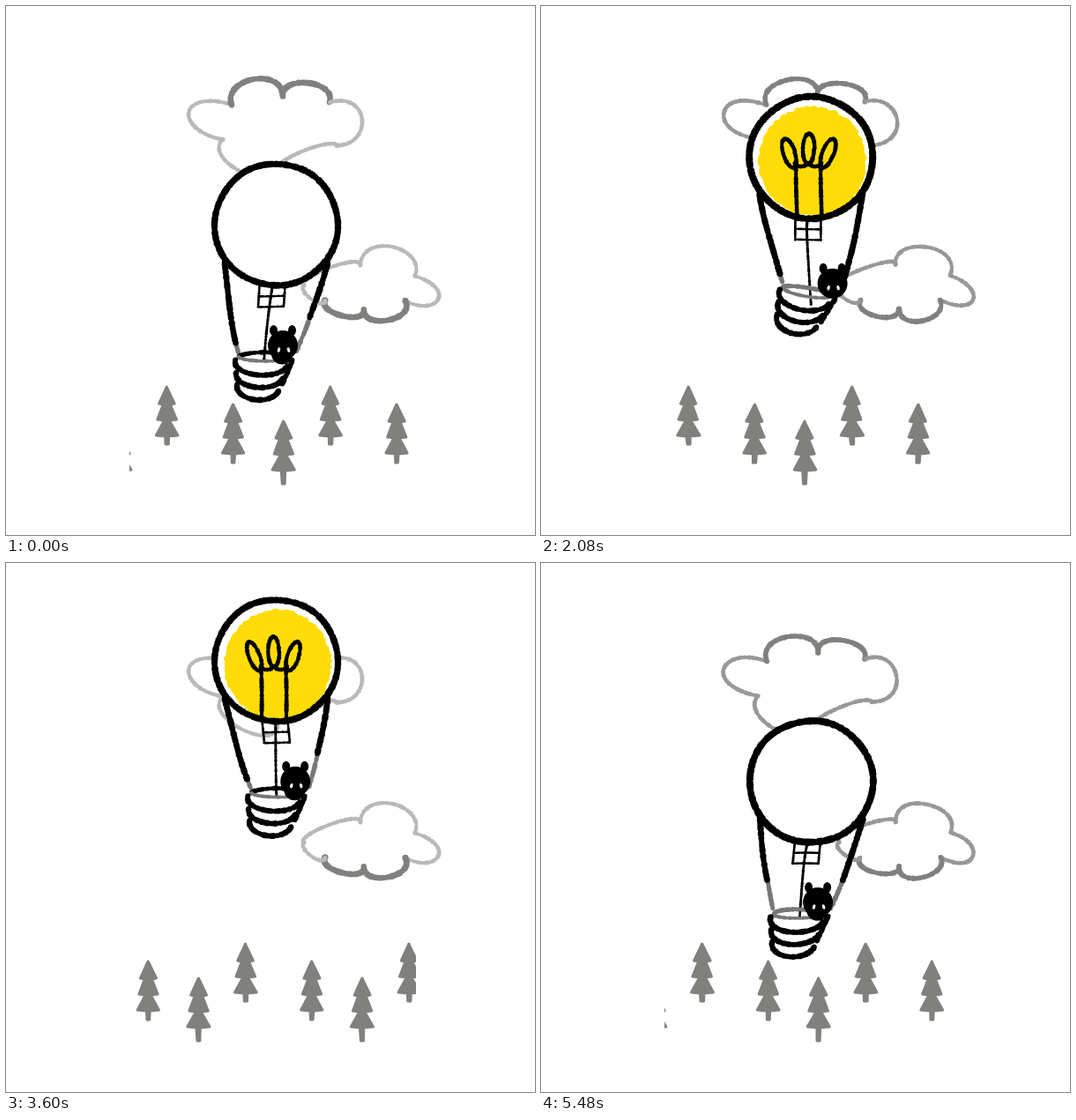
Write an HTML page with a canvas that moves like this. It is 600 px wide and 600 px high and loops after 5.52 s.

```html
<!DOCTYPE html>
<html lang="en">
<head>
<meta charset="utf-8">
<title>Balloon</title>
<style>
html, body { margin: 0; width: 100%; height: 100%; overflow: hidden; background: #fff }
canvas { display: block }
</style>
</head>
<body>
<canvas width="600" height="600"></canvas>
<script>
const LOOP = 5520, STEP = 40, TAU = Math.PI * 2, CX = 306.5, RADIUS = 69;
const GREY = '#80807e', DRY = '#777', INK = '#000';
const ctx = document.querySelector('canvas').getContext('2d');
let look = 0; // which of three redrawn line sets is showing

const mix = (a, b, u) => a + (b - a) * u;
const mixPt = (a, b, u) => [mix(a[0], b[0], u), mix(a[1], b[1], u)];
const clamp = u => Math.max(0, Math.min(1, u));
const ease = (t, from, to) => { const u = clamp((t - from) / (to - from)); return u * u * (3 - 2 * u); };
const bump = (t, at, width) => Math.exp(-(((t - at) / width) ** 2));
const noise = n => { const s = Math.sin(n * 12.9898 + look * 78.233) * 43758.5453; return s - Math.floor(s) - .5; };

// Distance gained when speed grows from 0 to 1 over `span` ms around `mid`.
const glide = (t, mid, span) => {
  const x = (t - mid) / span + .5;
  return x > 1 ? t - mid : span * Math.max(0, x) ** 2 / 2;
};

const motion = {
  scroll: t => .0065 * t + .054 * (glide(t, 2250, 800) - glide(t, 5020, 1000)),
  lift: t => ease(t, 1740, 2380) - ease(t, 4540, 5440),
  height: t => 248 + motion.lift(t) * (3 * Math.cos((t - 2680) / 800 * TAU) - 139),
  swing: t => bump(t, 2680, 190) - .25 * bump(t, 2150, 180),
  sway: t => 298 - 8 * Math.cos(4 * t / LOOP * TAU) + 45 * motion.swing(t)
};

// Curves are functions of a position 0..1.
const line = (a, b) => u => mixPt(a, b, u);
const bezier = (a, b, c, d) => u => {
  const m = mixPt(b, c, u);
  return mixPt(mixPt(mixPt(a, b, u), m, u), mixPt(m, mixPt(c, d, u), u), u);
};
const through = (a, mid, b) => {
  const c = [0, 1].map(i => 2 * mid[i] - (a[i] + b[i]) / 2);
  return bezier(a, mixPt(a, c, 2 / 3), mixPt(b, c, 2 / 3), b);
};
const arc = (x, y, rx, ry, from = 0, to = TAU, tilt = 0) => u => {
  const a = mix(from, to, u), p = rx * Math.cos(a), q = ry * Math.sin(a);
  return [x + p * Math.cos(tilt) - q * Math.sin(tilt), y + p * Math.sin(tilt) + q * Math.cos(tilt)];
};

function brush(curve, width, color = INK, from = 0, to = 1) {
  let len = 0;
  for (let i = 0, p = curve(from); i < 12; i++) {
    const q = curve(mix(from, to, (i + 1) / 12));
    len += Math.hypot(q[0] - p[0], q[1] - p[1]);
    p = q;
  }
  const n = Math.ceil(len / 1.2);
  ctx.fillStyle = color;
  ctx.beginPath();
  for (let i = 0; i <= n; i++) {
    const [x, y] = curve(mix(from, to, i / n));
    const r = width / 2 + noise(i + n / 7) * Math.min(1, width * .16);
    const dx = Math.sin(i * .07 + look * 2) * .4, dy = Math.cos(i * .09 + look * 2) * .4;
    ctx.moveTo(x + dx + r, y + dy);
    ctx.arc(x + dx, y + dy, r, 0, TAU);
  }
  ctx.fill();
}

function oval(x, y, rx, ry, color, tilt = 0) {
  ctx.fillStyle = color;
  ctx.beginPath();
  ctx.ellipse(x, y, rx, ry, tilt, 0, TAU);
  ctx.fill();
}

// Lobes run clockwise between the corners [x, y, bulge]; a run of them is shaded dark.
function cloud(corners, dark, count) {
  corners.forEach(([x, y, bulge], i) => {
    const [x2, y2] = corners[(i + 1) % corners.length];
    const dx = x2 - x, dy = y2 - y, h = bulge / .75 / Math.hypot(dx, dy), spread = bulge > 0 ? .12 : 0;
    const shaded = i >= dark && i < dark + count;
    brush(bezier([x, y], [x + dy * h - dx * spread, y - dx * h - dy * spread],
      [x2 + dy * h + dx * spread, y2 - dx * h + dy * spread], [x2, y2]),
      shaded ? (look ? 5.5 : 6.5) : 4.5, shaded ? GREY : look ? '#989898' : '#b9b9b9');
  });
}

function tree(x, y, trunk) {
  const side = [[0, 1]];
  for (let i = 0; i < 3; i++) side.push([9 + 1.7 * i, 20 + 18 * i], [4 - i, 21 + 18 * i]);
  side.push([1.5, trunk]);
  ctx.beginPath();
  side.forEach(([a, b], i) => ctx.lineTo(x + a + noise(i + y), y + b));
  side.reverse().forEach(([a, b], i) => ctx.lineTo(x - a + noise(i + y + 20), y + b));
  ctx.closePath();
  ctx.fill();
  ctx.stroke();
}

function trees(t) {
  ctx.save();
  ctx.beginPath();
  ctx.rect(140, 400, 325, 160);
  ctx.clip();
  ctx.fillStyle = ctx.strokeStyle = GREY;
  ctx.lineWidth = 3;
  ctx.lineJoin = 'round';
  for (let x = 182.5 - 185.5 - motion.scroll(t); x < 500; x += 185.5) {
    tree(x, 431, 66);
    tree(x + 75, 451, 67);
    tree(x + 132, 470, 72);
  }
  ctx.restore();
}

function light(cy) {
  ctx.fillStyle = '#ffdc05';
  ctx.beginPath();
  for (let i = 0; i < 120; i++) {
    const [x, y] = arc(308, cy + 4, 61 + noise(i) * 3, 62 + noise(i) * 3)(i / 120);
    ctx.lineTo(x, y);
  }
  ctx.fill();
  for (const i of [-1, 0, 1]) {
    brush(arc(303.5 + 22 * i, cy - 10 + 5 * i * i, 6.5, 17, 0, TAU, .35 * i), 4.6);
    if (i) {
      brush(line([303.5 + 14 * i, cy + 10], [304 + 14 * i, cy + 67]), 4.6);
      brush(arc(303.5 + 8 * i, cy + 6, 7, 4, 0, Math.PI), 4.6);
    }
  }
}

function basket(at) {
  const ring = (...a) => { const c = arc(...a); return u => at(c(u)); };
  brush(ring(2, -23, 28, 5, Math.PI, TAU), 5, look ? DRY : INK);
  brush(ring(2, -23, 28, 5, 0, Math.PI), 4, DRY);
  for (let i = 0; i < 3; i++) {
    brush(ring(-i * 2, -17 + 14 * i, 30 - 3 * i, 15, .25, Math.PI + .2), 6);
  }
  brush(line(at([35, -20]), at([23, 8])), 5.5);
}

function passenger(head, hip, k) {
  const [x, y] = head, r = mix(17, 14, k);
  brush(line(head, hip), mix(24, 16, k));
  oval(x, y, r, r, INK);
  for (const s of [-1, 1]) {
    oval(x + s * mix(10.5, 6, k) - 4 * k, y - r, 4.5, 6, INK);
    oval(x + 1 + s * mix(5.5, 4, k), y + mix(5, -2, k), 1.6, 2.8, '#fff', -.3 * s);
  }
}

function balloon(t) {
  const cy = motion.height(t), bx = motion.sway(t), k = motion.swing(t), hang = Math.max(0, k);
  const by = cy + 173 - 7 * k, c = Math.cos(.75 * k), s = -Math.sin(.75 * k);
  const at = ([x, y]) => [bx + x * c - y * s, by + x * s + y * c];
  const near = (rest, swung) => { const p = mixPt(rest, swung, k); return [bx + p[0], by + p[1]]; };

  // Ropes slacken and bow out as the basket swings up
  for (const side of [-1, 1]) {
    const top = [CX + side * mix(58.5, 64 + 4 * side, hang), cy + 42 - 12 * hang];
    const end = at([6 + 33 * side, -29]), m = mixPt(top, end, .5);
    const rope = through(top, [m[0] + side * (2 + 12 * hang), m[1] + 11 * hang], end);
    const dry = look === 1 ? .68 : side > 0 && !look ? .62 : .9;
    brush(rope, 5, DRY, dry);
    brush(rope, 6.5, INK, 0, dry);
  }

  // Socket and pull cord
  const lean = (bx - 297) * .4 * (1 - hang * .95);
  const socket = (x, y) => [304 + x + lean * (y - 50) / 35, cy + y];
  for (const x of [-15, 14]) brush(line(socket(x, 69), socket(x, 93)), 2.8);
  for (const y of [81, 93]) brush(line(socket(-15, y), socket(14, y)), 2.5);
  brush(through(socket(0, 68), socket(-2, 94), near([3, -19], [-30, -68])), 3.2);

  basket(at);
  passenger(near([24, -36], [-24, -56]), near([23, -27], [-10, -16]), hang);

  oval(CX, cy, RADIUS, RADIUS, '#fff');
  if (t >= 1720 && t < 4440) light(cy);
  brush(arc(CX, cy, RADIUS + 1, RADIUS), look ? 7.5 : 7);
}

function draw() {
  const frame = Math.floor(performance.now() % LOOP / STEP), t = frame * STEP;
  look = [0, 2, 1][Math.floor((frame % 10 + 1.4) * .3) % 3];
  ctx.fillStyle = '#fff';
  ctx.fillRect(0, 0, 600, 600);
  cloud([[246, 151, 45], [256, 112, 24], [314, 102, 18], [367, 109, 33], [375, 158, -8], [308, 185, 23]], 1, 2);
  cloud([[338, 317, 9], [402, 294, 27], [464, 306, 34], [453, 334, 18], [406, 344, 13], [362, 334, 8]], 3, 2);
  trees(t);
  balloon(t);
  requestAnimationFrame(draw);
}
draw();
</script>
</body>
</html>
```
